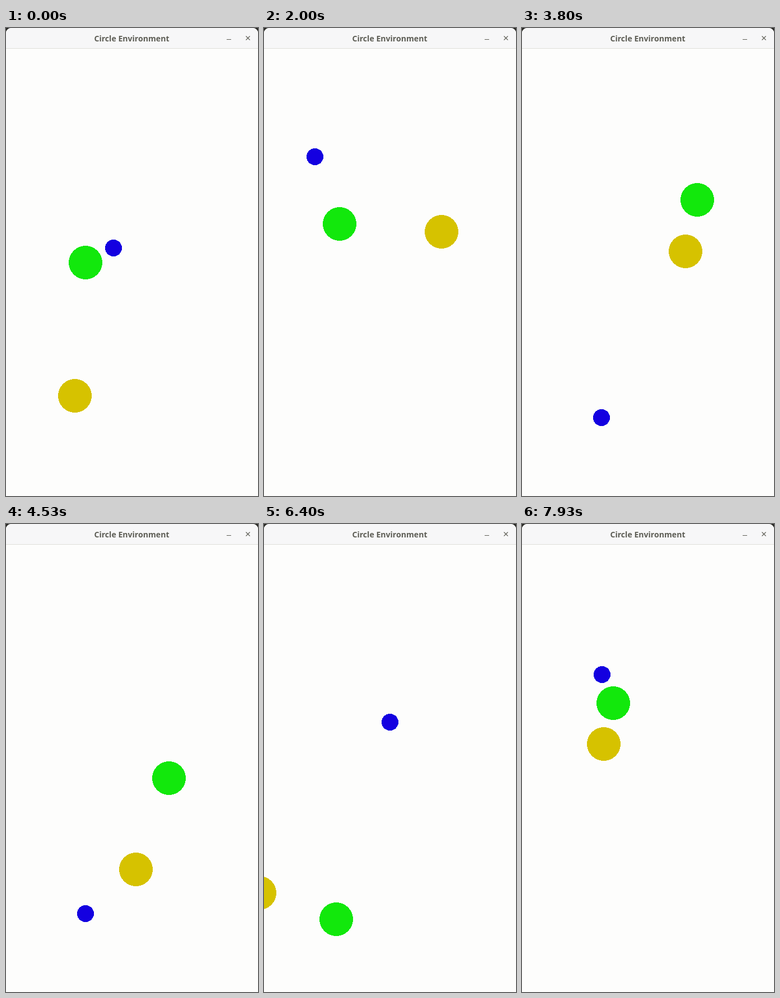
Recreate the animation shown at these times as an HTML page. Size 450 px wide and 836 px high, loop 8000 ms.

```html
<!DOCTYPE html>
<html lang="en">
<head>
<meta charset="utf-8">
<title>Circle Environment</title>
<style>
  html, body { margin: 0; width: 100%; height: 100%; overflow: hidden; background: #2a2a26; }
  svg { display: block; width: 450px; height: 836px; }
  text { font: 700 14.1px "Noto Sans", "Open Sans", sans-serif; fill: #5d5d55; text-anchor: middle; }
  circle { shape-rendering: crispEdges; }
</style>
</head>
<body>
<svg viewBox="0 0 450 836">
  <path d="M0 836V9A9 9 0 0 1 9 0H441A9 9 0 0 1 450 9V836Z" fill="#fdfdfc"/>
  <path d="M0 36V9A9 9 0 0 1 9 0H441A9 9 0 0 1 450 9V36Z" fill="#f7f7f8"/>
  <path d="M0 36.5H450" stroke="#dededa"/>
  <text x="224.5" y="24">Circle Environment</text>
  <path d="M394 20.5H402M428.5 14.5L435.5 21.5M435.5 14.5L428.5 21.5" stroke="#5d5d55" stroke-width="1.2" fill="none"/>
  <circle id="goal" r="15" fill="#1400e0"/>
  <circle id="ball" r="30" fill="#d6c200"/>
  <circle id="agent" r="30" fill="#12e80c"/>
</svg>
<script>
  const FPS = 15, LOOP = 8000, TOUCH = 60, FLOOR = 706;

  // The agent leaves its spawn point at a constant velocity in pixels per step.
  const rounds = [
    { start: 0, goal: [192, 393], ball: [123, 657], agent: [142, 419], velocity: [-2.83, 13] },
    { start: 25, goal: [91, 230], ball: [317, 364], agent: [68, 350], velocity: [13.4, 0] },
    { start: 46, goal: [142, 696], ball: [292, 399], agent: [335, 160], velocity: [-2, 13.36] },
    { start: 77, goal: [225, 354], ball: [190, 690], agent: [381, 569], velocity: [-13.25, 13.1] },
    { start: 97, goal: [143, 269], ball: [146, 393], agent: [207, 66], velocity: [-2, 11.55] }
  ];

  const byId = id => document.getElementById(id);
  const goal = byId("goal"), ball = byId("ball"), agent = byId("agent");

  const dot = (a, b) => a[0] * b[0] + a[1] * b[1];
  const move = (p, v, t) => [p[0] + v[0] * t, p[1] + v[1] * t];

  // Finds the moment of contact and the elastic kick along the contact normal.
  function addKick(round) {
    const gap = move(round.ball, round.agent, -1);
    const speed2 = dot(round.velocity, round.velocity);
    const closing = dot(gap, round.velocity);
    const root = closing ** 2 - speed2 * (dot(gap, gap) - TOUCH ** 2);
    round.hit = root < 0 ? Infinity : (closing - Math.sqrt(root)) / speed2;
    if (root < 0) return;
    const normal = move(gap, round.velocity, -round.hit).map(d => d / TOUCH);
    const push = 2 * dot(round.velocity, normal);
    round.kick = normal.map(n => n * push);
  }
  rounds.forEach(addKick);

  function place(circle, [x, y]) {
    circle.setAttribute("cx", Math.round(x));
    circle.setAttribute("cy", Math.round(y));
  }

  function draw(ms) {
    // The small lead absorbs frame times rounded to 10 ms.
    const step = Math.floor((ms + 5) % LOOP * FPS / 1000);
    const round = rounds.filter(r => r.start <= step).pop();
    const t = step - round.start;
    const [x, y] = move(round.agent, round.velocity, t);
    place(goal, round.goal);
    place(ball, t > round.hit ? move(round.ball, round.kick, t - round.hit) : round.ball);
    place(agent, [x, Math.min(y, FLOOR)]);
  }

  const begin = performance.now();
  function tick() {
    draw(performance.now() - begin);
    requestAnimationFrame(tick);
  }
  tick();
</script>
</body>
</html>
```
